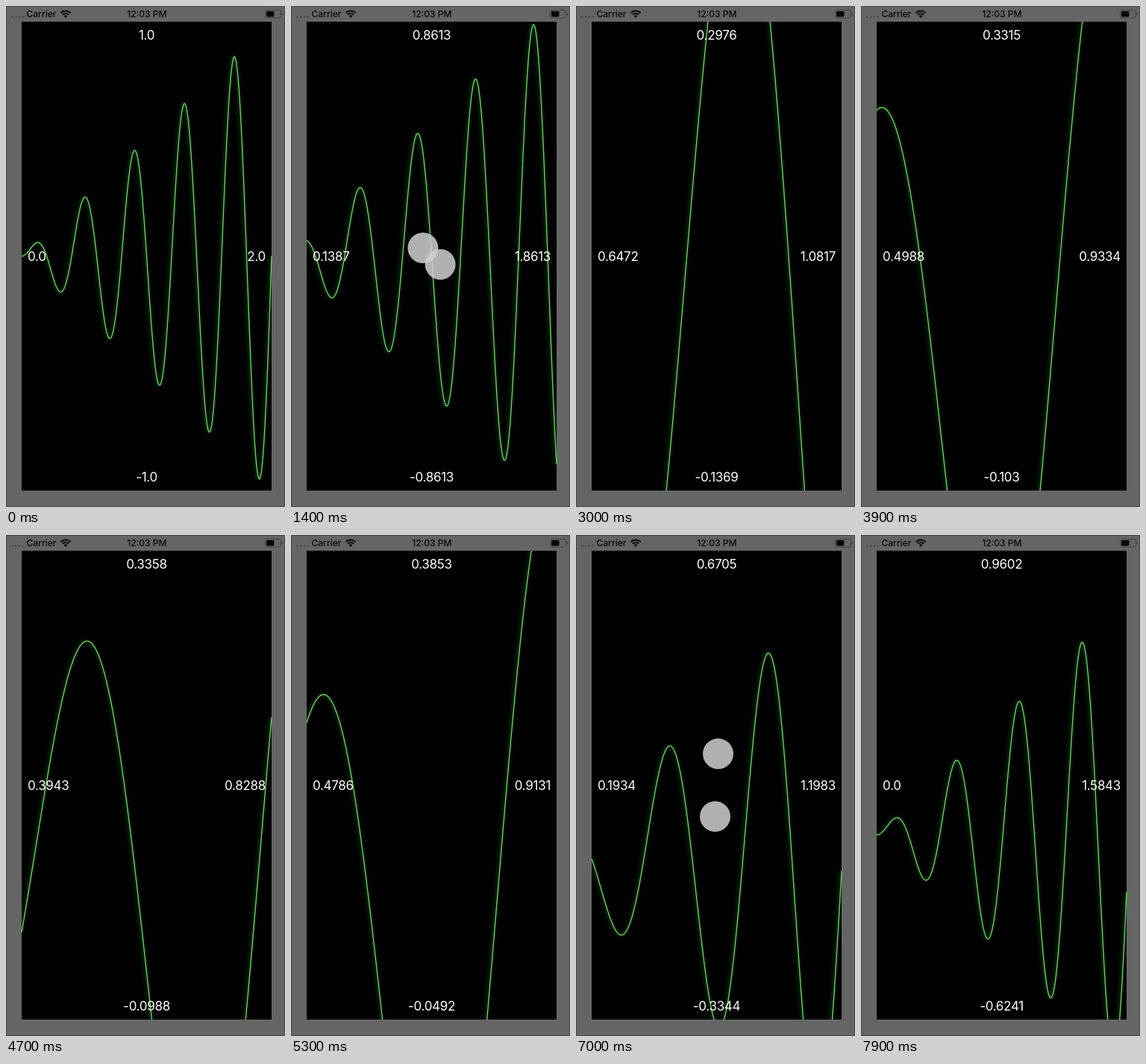
These frames come from a looping animation (374x670 px, 8000 ms). An HTML page with a canvas:

```html
<!DOCTYPE html>
<html lang="en">
<head>
<meta charset="utf-8">
<title>Zoomable plot</title>
<style>
html, body { margin: 0; width: 100%; height: 100%; overflow: hidden; background: #656565; }
canvas { display: block; }
</style>
</head>
<body>
<canvas id="stage" width="374" height="670"></canvas>
<script>
const g = document.getElementById('stage').getContext('2d');
const LOOP = 8000, STEP = 100;
const LEFT = 21, TOP = 21, W = 335, H = 627;
const MID_X = LEFT + W / 2, MID_Y = TOP + H / 2;
const SANS = 'Inter, "Liberation Sans", sans-serif';

// Smooth track through [time, value] keys that never overshoots them.
function track(keys) {
  const secant = i => (keys[i + 1][1] - keys[i][1]) / (keys[i + 1][0] - keys[i][0]);
  const slope = i => {
    if (i === 0 || i === keys.length - 1) return 0;
    const a = secant(i - 1), b = secant(i);
    return a * b > 0 ? 2 * a * b / (a + b) : 0;
  };
  return t => {
    if (t <= keys[0][0]) return keys[0][1];
    const i = keys.findIndex(k => k[0] >= t) - 1;
    if (i < 0) return keys[keys.length - 1][1];
    const [t0, v0] = keys[i], [t1, v1] = keys[i + 1];
    const d = t1 - t0, u = (t - t0) / d, s = u * u * (3 - 2 * u);
    return v0 + (v1 - v0) * s
      + d * u * (1 - u) * ((1 - u) * slope(i) - u * slope(i + 1));
  };
}

const zoom = track([[1300, 1 / 2], [2000, 1 / .4598], [2200, 1 / .43455],
  [6100, 1 / .43455], [6400, 1 / .4773], [7000, 1 / 1.0049], [7700, 1 / 1.5843]]);
const centerX = track([[2500, 1], [3000, .86445], [3300, .802], [3500, .802],
  [4400, .596], [4500, .596], [4700, .61155], [5300, .69585]]);
const centerY = track([[2500, 0], [3000, .08035], [3300, .118], [3500, .118],
  [4400, .109], [4500, .109], [4700, .1185], [5300, .16805]]);
const fingerX = track([[1300, -12], [2000, -4], [2200, -3.5],
  [6100, 25], [6400, 22.4], [7000, 2], [7700, -3]]);
const pinches = [{ from: 1000, to: 2200, reach: 27.55 }, { from: 6200, to: 7900, reach: 42.15 }];

const wave = x => x / 2 * Math.sin(5 * Math.PI * x);
const clamp = (v, lo, hi) => Math.max(lo, Math.min(hi, v));

function text(str, x, y, align, font, color) {
  g.font = font + ' ' + SANS;
  g.textAlign = align;
  g.fillStyle = color;
  g.fillText(str, x, y);
}

function label(value, x, y, align) {
  const n = +value.toFixed(4);
  g.letterSpacing = '-0.3px';
  text(Number.isInteger(n) ? n.toFixed(1) : String(n), x, y, align, '17px', '#fff');
  g.letterSpacing = '0px';
}

function disc(x, y, r, color) {
  g.fillStyle = color;
  g.beginPath();
  g.arc(x, y, r, 0, 2 * Math.PI);
  g.fill();
}

function box(x, y, w, h, r) {
  g.beginPath();
  g.roundRect(x, y, w, h, r);
}

function statusBar() {
  for (let i = 0; i < 4; i++) disc(8.5 + i * 4.7, 14.6, 1.3, '#4b4b4b');
  text('Carrier', 27.5, 15, 'left', '500 12px', '#080808');
  text('12:03 PM', 188.8, 15, 'center', '500 12px', '#080808');

  g.strokeStyle = '#080808';
  g.lineWidth = 2;
  for (const r of [9, 5.6]) {
    g.beginPath();
    g.arc(80, 15.5, r, -Math.PI * .76, -Math.PI * .24);
    g.stroke();
  }
  g.fillStyle = '#080808';
  g.beginPath();
  g.moveTo(80, 16);
  g.arc(80, 15.5, 3, -Math.PI * .76, -Math.PI * .24);
  g.fill();

  g.strokeStyle = '#414141';
  g.lineWidth = 1;
  box(347.5, 5.5, 21, 10.5, 2.7);
  g.stroke();
  g.fillStyle = '#080808';
  box(349, 7, 10.5, 7.5, 1.4);
  g.fill();
  g.fillStyle = '#414141';
  box(369.5, 9, 1.4, 3.8, .7);
  g.fill();
}

function curve(x0, y0, span) {
  g.save();
  g.beginPath();
  g.rect(LEFT - 4, TOP, W + 5, H);
  g.clip();
  g.beginPath();
  for (let p = 0; p <= W; p += .5) {
    const y = wave(x0 + p / W * span);
    g.lineTo(LEFT + p, TOP + H - (y - y0) / span * H);
  }
  g.strokeStyle = '#7bcb70';
  g.lineWidth = 1.35;
  g.lineJoin = 'round';
  g.shadowColor = 'rgba(0, 190, 0, .75)';
  g.shadowBlur = 5;
  g.shadowOffsetX = -1.5;
  g.stroke();
  g.restore();
}

function draw(t) {
  const span = 1 / zoom(t), half = span / 2;
  const x0 = clamp(centerX(t) - half, 0, 2 - span);
  const y0 = clamp(centerY(t) - half, -1, 1 - span);

  g.fillStyle = '#656565';
  g.fillRect(0, 0, 374, 670);
  g.strokeStyle = '#484848';
  g.lineWidth = 1;
  g.strokeRect(.5, .5, 373, 669);
  statusBar();
  g.fillStyle = '#000';
  g.fillRect(LEFT, TOP, W, H);
  curve(x0, y0, span);

  label(y0 + span, MID_X, 45.2, 'center');
  label(y0, MID_X, 635.8, 'center');
  label(x0, LEFT + 8, 340.7, 'left');
  label(x0 + span, LEFT + W - 8, 340.7, 'right');

  const pinch = pinches.find(p => t >= p.from && t < p.to);
  if (pinch) {
    const dx = fingerX(t), dy = -Math.sqrt((pinch.reach * zoom(t)) ** 2 - dx * dx);
    for (const side of [1, -1])
      disc(MID_X + side * dx, MID_Y + side * dy, 20.5, 'rgba(207, 207, 207, .85)');
  }
}

function tick() {
  const t = (performance.now() + 5) % LOOP;
  draw(Math.floor(t / STEP) * STEP);
  requestAnimationFrame(tick);
}
tick();
</script>
</body>
</html>
```
